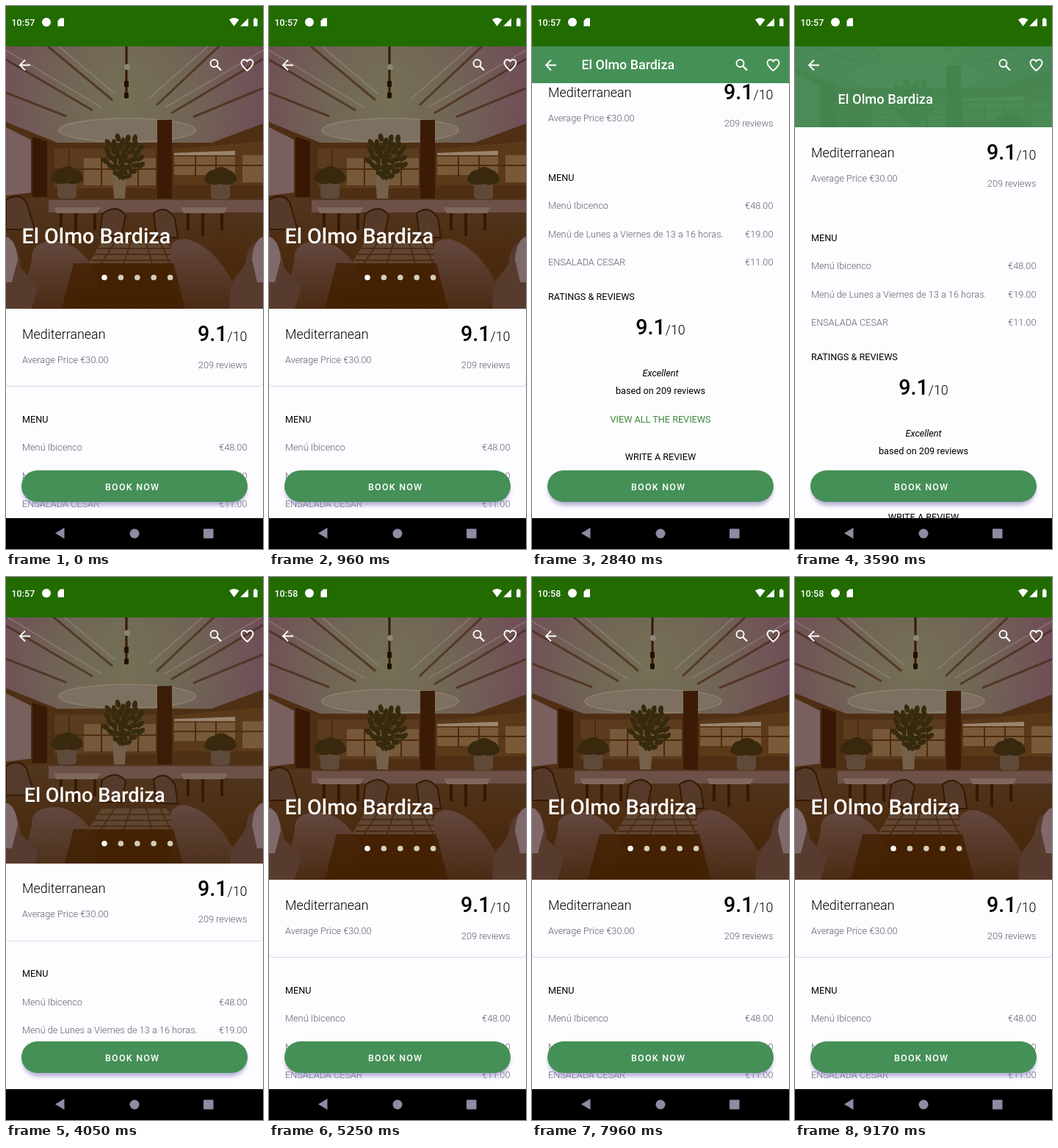
Recreate the animation shown at these times as an HTML page. Size 350 by 739 pixels, loop 9.21 s.

```html
<!DOCTYPE html>
<html lang="en">
<head>
<meta charset="utf-8">
<title>Collapsing restaurant header</title>
<style>
  html, body { margin: 0; width: 100%; height: 100%; overflow: hidden; background: #fdfcff; }
  svg { display: block; width: 100%; height: 100%; font: 12.65px Roboto, sans-serif; }
  .soft { fill: #625d6c; font-weight: 300; font-size: 12.75px; }
  .light { font-weight: 300; font-size: 17.9px; }
  .end { text-anchor: end; }
  .mid { text-anchor: middle; }
  .score { font-size: 28.6px; font-weight: 500; }
  .icon { fill: none; stroke: #fff; stroke-width: 1.9; }
</style>
</head>
<body>
<svg viewBox="0 0 350 739">
  <defs>
    <clipPath id="headerClip"><rect id="headerBox" y="55" width="350" height="357"/></clipPath>
    <radialGradient id="ceiling" gradientUnits="userSpaceOnUse" cx="165" cy="125" r="185" gradientTransform="translate(0 -25) scale(1 1.200)">
      <stop offset="0" stop-color="#757056"/><stop offset=".45" stop-color="#716655"/><stop offset="1" stop-color="#704e57"/>
    </radialGradient>
    <linearGradient id="floor" x2="0" y2="1">
      <stop offset="0" stop-color="#52351f"/><stop offset=".6" stop-color="#4a2a0e"/><stop offset="1" stop-color="#452200"/>
    </linearGradient>
    <linearGradient id="chair" x2="0" y2="1">
      <stop offset="0" stop-color="#64483f"/><stop offset="1" stop-color="#4a2b14"/>
    </linearGradient>
    <filter id="blur" x="-20%" y="-50%" width="140%" height="200%"><feGaussianBlur stdDeviation="2.5"/></filter>
    <g id="plant">
      <rect x="-13" y="4" width="26" height="25" rx="5" fill="#5f4a3a"/>
      <path d="M-22 4Q-20-10-9-11Q1-19 11-11Q22-8 22 4Q12 12 0 8Q-13 12-22 4Z" fill="#38280e"/>
    </g>
    <g id="dining">
      <path d="M-34-7H30L25 1H-30Z" fill="#80685c"/>
      <path d="M-4 1V32M-24 1V24M22 1V24" stroke="#351804" stroke-width="4"/>
    </g>
  </defs>

  <rect width="350" height="739" fill="#fdfcff"/>

  <g id="content">
    <path d="M0 513Q0 517.500 5 517.500H345Q350 517.500 350 513" fill="none" stroke="#d8d5e6" id="divider"/>
    <text x="22" y="452.500" class="light">Mediterranean</text>
    <text x="22" y="485.500" class="soft">Average Price €30.00</text>
    <text x="328.500" y="456" class="score end">9.1<tspan class="light">/10</tspan></text>
    <text x="328.500" y="492.500" class="soft end">209 reviews</text>
    <text x="22" y="566.500">MENU</text>
    <g id="menu" class="soft"></g>
    <text x="22" y="729">RATINGS &amp; REVIEWS</text>
    <text x="175" y="776" class="score mid">9.1<tspan class="light">/10</tspan></text>
    <text x="175" y="832.500" class="mid" font-style="italic">Excellent</text>
    <text x="175" y="857" class="mid">based on 209 reviews</text>
    <text x="175" y="895.500" class="mid" fill="#3f8a3a">VIEW ALL THE REVIEWS</text>
    <text x="175" y="946.500" class="mid">WRITE A REVIEW</text>
  </g>

  <g clip-path="url(#headerClip)">
    <g id="photo">
      <rect y="55" width="350" height="357" fill="url(#ceiling)"/>
      <path d="M0 73L118 142M57 55L145 128M290 55L205 135M350 72L225 146M0 118L82 150M350 112L255 151"
        stroke="#4a2a16" stroke-width="3" opacity=".75"/>
      <path d="M0 60L130 138M72 55L149 120M275 55L194 126M350 60L217 138" stroke="#a5948a" stroke-width="2" opacity=".4"/>
      <path d="M164 55V126" stroke="#341803" stroke-width="3"/>
      <path d="M161 102h6v8h-6zM161 118h6v7h-6z" fill="#211000"/>
      <circle cx="165" cy="83" r="4" fill="#8c857c"/>
      <ellipse cx="165" cy="169" rx="93" ry="16" fill="#7d7060" stroke="#8f806f" stroke-width="1.500"/>
      <path d="M0 158L70 186H280L350 160V265H0Z" fill="#4f2f14"/>
      <path d="M0 165L34 182V254L0 258Z" fill="#79605e"/>
      <path d="M36 178L56 184V260H36Z" fill="#371804"/>
      <path d="M66 194H204V248H66Z" fill="#5b3b1e"/>
      <path d="M106 207H204V244H106Z" fill="#76593a"/>
      <path d="M228 195L350 184V244H228Z" fill="#5b3918"/>
      <path d="M229 205H312V230H229ZM322 203H350V240H322Z" fill="#785a38"/>
      <path d="M229 200L312 197V203H229Z" fill="#9a846f"/>
      <path d="M66 222H204M229 217H350M86 195V247M130 205V245M180 205V245M258 203V232M286 203V232"
        stroke="#4c2a0b" stroke-width="2"/>
      <rect x="206" y="155" width="20" height="110" fill="#3b1b06"/>
      <rect y="262" width="350" height="150" fill="url(#floor)"/>
      <path d="M58 264H350V281H58Z" fill="#6d5148"/>
      <path d="M130 322H219L239 351H112Z" fill="#604630"/>
      <path d="M126 330H225M119 338H231M117 346H235M148 322L129 351M170 322L160 351M191 322L199 351M210 322L224 351"
        stroke="#4a2b18" stroke-width="2"/>
      <use href="#dining" x="99" y="281"/><use href="#dining" x="272" y="281"/>
      <path d="M0 264Q18 253 28 267L39 304H0ZM131 283Q151 268 163 285L157 313H128ZM201 282Q218 269 230 289L234 315H205Z"
        fill="#553a2a" stroke="#351802" stroke-width="2"/>
      <use href="#plant" x="83" y="233"/><use href="#plant" x="292" y="234"/>
      <path d="M145 230H164L162 262H147Z" fill="#75604a"/>
      <path d="M160 237L151 192M157 235L165 177M155 234L181 198M156 236L135 207" stroke="#332a0b" stroke-width="3"/>
      <g id="leaves" fill="#362a0e"></g>
      <path d="M35 345Q32 319 72 320Q107 327 127 371L119 390L73 411H20Z" fill="url(#chair)"/>
      <path d="M0 318Q17 323 20 356L44 382L35 412H0Z" fill="#573b2f"/>
      <path d="M0 314Q14 318 16 345L8 376H0Z" fill="#80696a"/>
      <path d="M225 341Q219 318 244 317Q280 324 308 374L350 325V412H238L225 386Z" fill="url(#chair)"/>
      <path d="M350 318Q329 321 326 350L306 383L304 412H350Z" fill="#573b2f"/>
      <path d="M350 314Q337 318 335 345L342 376H350Z" fill="#80696a"/>
      <path d="M92 350H228L244 412H76Z" fill="#432000" opacity=".82"/>
      <g id="dots" fill="#d6cdbb"></g>
    </g>
    <rect id="scrim" y="55" width="350" height="357" fill="#459057"/>
  </g>

  <rect width="350" height="55" fill="#226b00"/>
  <g fill="#fff">
    <text id="clock" x="7.500" y="26.500" font-size="12.500" font-weight="500"></text>
    <circle cx="55" cy="22" r="6"/>
    <path d="M74 16.500H79V27.500H70.500V20ZM304 18.500Q310.500 13.500 317.500 18.500L310.500 27.500ZM330 16.500V27.500H319ZM337 17.500H338.500V16H340.500V17.500H342.500V27.500H337Z"/>
  </g>
  <g class="icon">
    <path d="M33 80.500H19.500M26 73.500L19 80.500L26 87.500"/>
    <circle cx="283.500" cy="78" r="5"/><path d="M287.500 82L293 87.500" stroke-width="2.400"/>
    <path d="M328.500 88L326.500 86.200C322 82.200 320.500 80.300 320.500 77.300C320.500 74.700 322.400 73 324.700 73C326.300 73 327.700 73.900 328.500 75.200C329.300 73.900 330.700 73 332.300 73C334.600 73 336.500 74.700 336.500 77.300C336.500 80.300 335 82.200 330.500 86.200Z"/>
  </g>
  <text id="title" fill="#fff" font-weight="500" text-rendering="geometricPrecision">El Olmo Bardiza</text>

  <rect x="22" y="636" width="306" height="44" rx="22" fill="#8f86c0" opacity=".6" filter="url(#blur)"/>
  <rect x="21" y="632" width="308" height="43" rx="21.500" fill="#459057"/>
  <text x="135" y="658.500" fill="#fff" font-size="12.500" font-weight="500" letter-spacing="1.200">BOOK NOW</text>

  <rect y="697" width="350" height="42"/>
  <g fill="#918aa3">
    <path d="M67 717.500L79.500 710V725Z"/><circle cx="175" cy="718" r="6.500"/>
    <rect x="269" y="711.500" width="13.500" height="13" rx="1"/>
  </g>
</svg>
<script>
  const LOOP = 9210, MAX_SCROLL = 329, COLLAPSE = 307;
  const UP = { start: 1240, length: 1056 }, DOWN = { start: 3300, length: 893 };
  const SCRIM_IN = 1980, SCRIM_OUT = 3568, SCRIM_FADE = 600;
  const CLOCK_CHANGE = 5000;

  const el = id => document.getElementById(id);
  const progress = (t, start, length) => Math.min(1, Math.max(0, (t - start) / length));
  const smooth = x => x * x * (3 - 2 * x);
  const mix = (a, b, x) => a + (b - a) * x;

  const dishes = [
    ["Menú Ibicenco", "€48.00"],
    ["Menú de Lunes a Viernes de 13 a 16 horas.", "€19.00"],
    ["ENSALADA CESAR", "€11.00"]
  ];
  el("menu").innerHTML = dishes.map(([name, price], i) => {
    const y = 605 + i * 38.6;
    return `<text x="22" y="${y}">${name}</text><text class="end" x="328.5" y="${y}">${price}</text>`;
  }).join("");

  el("dots").innerHTML = Array.from({ length: 5 }, (_, i) =>
    `<circle cx="${134 + i * 22.4}" cy="369.5" r="3.8" ${i ? "" : 'fill="#fff"'}/>`).join("");

  // Leaf clusters fill an oval by the golden angle.
  el("leaves").innerHTML = Array.from({ length: 34 }, (_, i) => {
    const angle = i * 2.4, reach = Math.sqrt(i / 34);
    const x = 161 + 28 * reach * Math.cos(angle), y = 204 + 29 * reach * Math.sin(angle);
    return `<ellipse cx="${x}" cy="${y}" rx="6" ry="3.5" transform="rotate(${i * 67} ${x} ${y})"/>`;
  }).join("");

  function draw(t) {
    const scroll = MAX_SCROLL * (smooth(progress(t, UP.start, UP.length))
                               - smooth(progress(t, DOWN.start, DOWN.length)));
    const collapsed = Math.min(1, scroll / COLLAPSE);
    const headerShift = collapsed * COLLAPSE;

    el("content").setAttribute("transform", `translate(0 ${-scroll})`);
    el("divider").setAttribute("opacity", Math.max(0, 1 - scroll / 110));
    el("photo").setAttribute("transform", `translate(0 ${-0.3 * headerShift})`);
    el("headerBox").setAttribute("height", 357 - headerShift);

    const fadeIn = progress(t, SCRIM_IN, SCRIM_FADE) ** 2;
    const fadeOut = (1 - progress(t, SCRIM_OUT, SCRIM_FADE)) ** 3;
    el("scrim").setAttribute("opacity", fadeIn * fadeOut);

    const title = el("title");
    title.setAttribute("x", mix(21.5, 67.5, collapsed));
    title.setAttribute("y", mix(322.7, 86.3, collapsed));
    title.setAttribute("font-size", mix(28.6, 17.86, 1 - (1 - collapsed) ** 2));

    el("clock").textContent = t < CLOCK_CHANGE ? "10:57" : "10:58";
  }

  const began = performance.now();
  function frame() {
    draw((performance.now() - began) % LOOP);
    requestAnimationFrame(frame);
  }
  frame();
</script>
</body>
</html>
```
